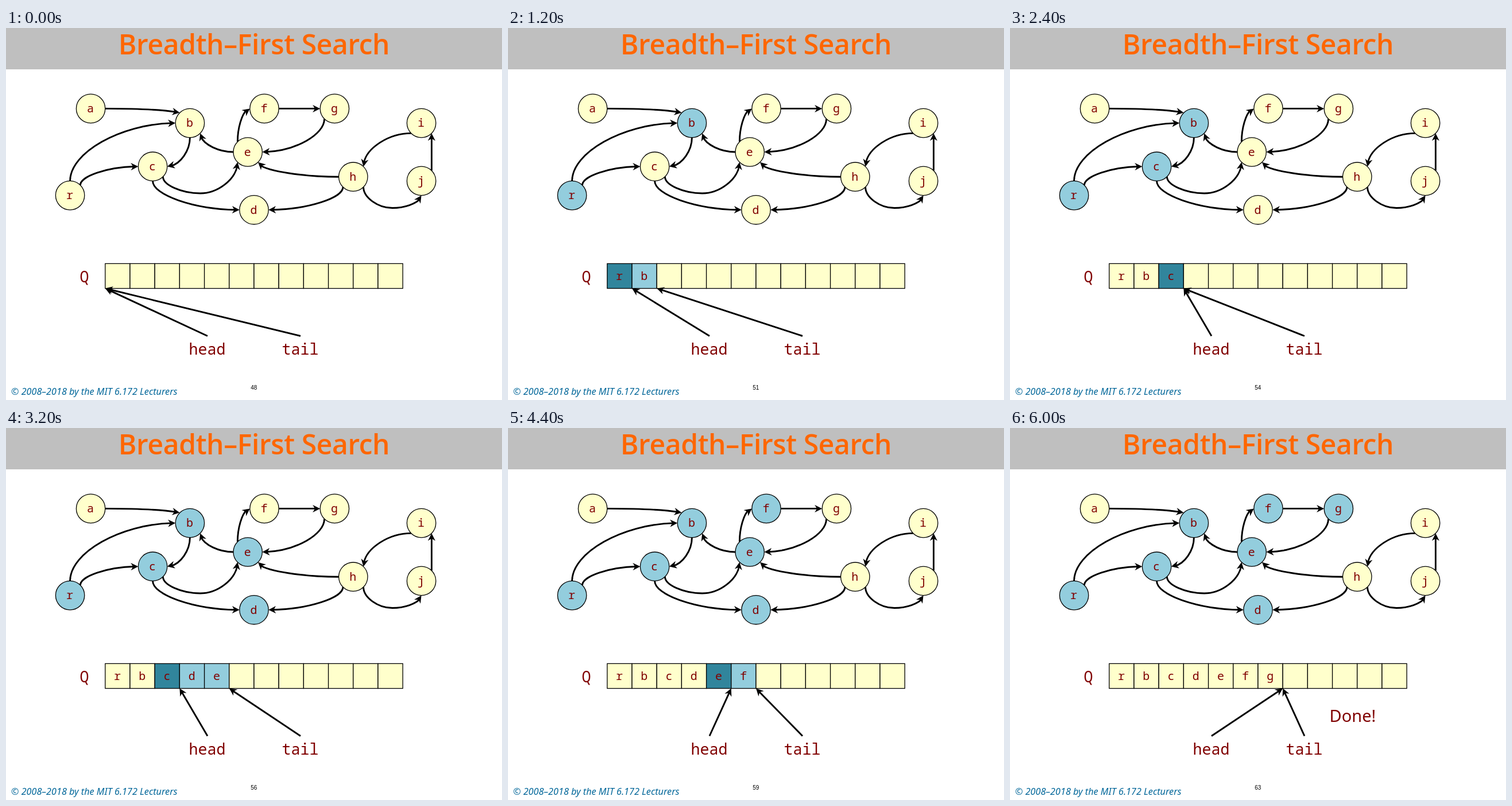
Recreate the animation shown at these times as an HTML page. Size 864 by 648 pixels, loop 6.4 s.

```html
<!DOCTYPE html>
<html lang="en">
<head>
<meta charset="utf-8">
<title>Breadth-First Search</title>
<style>
  html, body { margin: 0; width: 100%; height: 100%; overflow: hidden; background: #fff; }
  svg { display: block; width: 864px; height: 648px; }
  text { fill: #800000; text-anchor: middle; font-family: "Noto Sans", sans-serif; }
  .mono text { font: 20px "Noto Sans Mono", monospace; }
  .mono .big { font-size: 26.6px; }
  .title { font: 600 48px "Open Sans", sans-serif; letter-spacing: -0.4px; fill: #ff6600; }
  .credit { font-size: 16.2px; font-style: italic; text-anchor: start; fill: #006699; }
  #page { font: 10px "Liberation Sans", sans-serif; fill: #000; }
  #done { font-size: 29px; }
  circle, rect { stroke: #000; stroke-width: 1.3; }
  .shaft { fill: none; stroke: #000; stroke-width: 2.9; }
</style>
</head>
<body>
<svg viewBox="0 0 864 648">
  <path d="M0 0H864V72H0z" fill="#bfbfbf"/>
  <text class="title" x="432" y="46">Breadth–First Search</text>
  <g id="scene" class="mono">
    <text class="big" x="136.5" y="443">Q</text>
    <text class="big" x="350.5" y="569">head</text>
    <text class="big" x="512.5" y="569">tail</text>
  </g>
  <text id="done" x="597" y="512">Done!</text>
  <text class="credit" x="9" y="639">© 2008–2018 by the MIT 6.172 Lecturers</text>
  <text id="page" x="431.7" y="630"></text>
</svg>
<script>
const STEP = 400, FIRST_PAGE = 48;
const LIGHT = '#ffffcc', BLUE = '#93cddd', DARK = '#31859c';
const CELL = 43.2, LEFT = 172.8, TOP = 410.4, COUNT = 12;
const ORDER = 'rbcdefg';
// Queue pointers, one digit per step.
const HEAD = '0011123334556677', TAIL = '0112333455566777';

const NODES = {
  a: [147.6, 140.4], b: [320.4, 165.6], c: [255.6, 241.2], d: [432, 316.8],
  e: [421.2, 216], f: [450, 140.4], g: [572.4, 140.4], h: [604.8, 259.2],
  i: [723.6, 165.6], j: [723.6, 266.4], r: [111.6, 291.6]
};

// Quarter bends: leave along one axis, arrive along the other.
const downThenAcross = (x, y, u, v) => `M${x} ${y}C${x} ${(y + v) / 2} ${(x + u) / 2} ${v} ${u} ${v}`;
const acrossThenDown = (x, y, u, v) => `M${x} ${y}C${(x + u) / 2} ${y} ${u} ${(y + v) / 2} ${u} ${v}`;
// Hanging curve through a lowest point halfway between its ends.
const sag = (x, y, u, v, low) => {
  const mid = (x + u) / 2;
  return downThenAcross(x, y, mid, low) + acrossThenDown(mid, low, u, v).replace(/^M[^C]*/, '');
};

const EDGES = [
  'M172.8 140.4C235 140.4 273 142 302.6 147.5',
  downThenAcross(111.6, 266.4, 295.2, 165.6),
  downThenAcross(129.4, 273.8, 230.4, 241.2),
  downThenAcross(320.4, 190.8, 280.8, 241.2),
  sag(273.4, 259, 403.4, 233.8, 288),
  downThenAcross(255.6, 266.4, 406.8, 316.8),
  acrossThenDown(396, 216, 338.2, 183.4),
  downThenAcross(403.4, 198.2, 424.8, 140.4),
  'M475.2 140.4H547.2',
  downThenAcross(554.6, 158.2, 446.4, 216),
  acrossThenDown(579.6, 259.2, 439, 233.8),
  downThenAcross(587, 277, 457.2, 316.8),
  sag(622.6, 277, 723.6, 291.6, 313.5),
  acrossThenDown(705.8, 183.4, 622.6, 241.4),
  'M741.4 248.6V183.4'
];

const byId = id => document.getElementById(id);
const scene = byId('scene');

function add(tag, attrs, text = '') {
  const el = document.createElementNS('http://www.w3.org/2000/svg', tag);
  for (const key in attrs) el.setAttribute(key, attrs[key]);
  el.textContent = text;
  return scene.appendChild(el);
}

// Returns a setter that lays the shaft along d and turns the head with its last stretch.
function arrow() {
  const shaft = add('path', { class: 'shaft' });
  const head = add('path', { d: 'M0 0L-13 -6.5L-9 0L-13 6.5z' });
  return d => {
    shaft.setAttribute('d', d);
    const length = shaft.getTotalLength();
    const tip = shaft.getPointAtLength(length), back = shaft.getPointAtLength(length - 12);
    const angle = Math.atan2(tip.y - back.y, tip.x - back.x) * 180 / Math.PI;
    shaft.setAttribute('stroke-dasharray', `${length - 6} ${length}`);
    head.setAttribute('transform', `translate(${tip.x} ${tip.y}) rotate(${angle})`);
  };
}

EDGES.forEach(d => arrow()(d));

const circles = {};
for (const [name, [cx, cy]] of Object.entries(NODES)) {
  circles[name] = add('circle', { cx, cy, r: 25.2 });
  add('text', { x: cx - 0.5, y: cy + 6.8 }, name);
}

const cells = Array.from({ length: COUNT }, (_, i) => {
  const x = LEFT + i * CELL;
  return {
    box: add('rect', { x, y: TOP, width: CELL, height: CELL }),
    label: add('text', { x: x + CELL / 2 - 0.3, y: 439.3 }, ORDER[i])
  };
});

const headArrow = arrow(), tailArrow = arrow();
const toSlot = (x, slot) => `M${x} 536.5L${LEFT + slot * CELL} ${TOP + CELL}`;

function show(step) {
  const head = +HEAD[step], tail = +TAIL[step];
  const done = step === HEAD.length - 1;
  cells.forEach(({ box, label }, i) => {
    const active = i === head - 1 && !done;
    const queued = i >= head && i < tail;
    box.setAttribute('fill', active ? DARK : queued ? BLUE : LIGHT);
    label.setAttribute('visibility', i < tail ? 'visible' : 'hidden');
  });
  for (const name in circles) {
    const seen = ORDER.slice(0, tail).includes(name);
    circles[name].setAttribute('fill', seen ? BLUE : LIGHT);
  }
  headArrow(toSlot(351, head));
  tailArrow(toSlot(513, tail));
  byId('done').setAttribute('visibility', done ? 'visible' : 'hidden');
  byId('page').textContent = FIRST_PAGE + step;
}

const start = performance.now();
function frame() {
  show(Math.floor((performance.now() - start) / STEP) % HEAD.length);
  requestAnimationFrame(frame);
}
frame();
</script>
</body>
</html>
```
